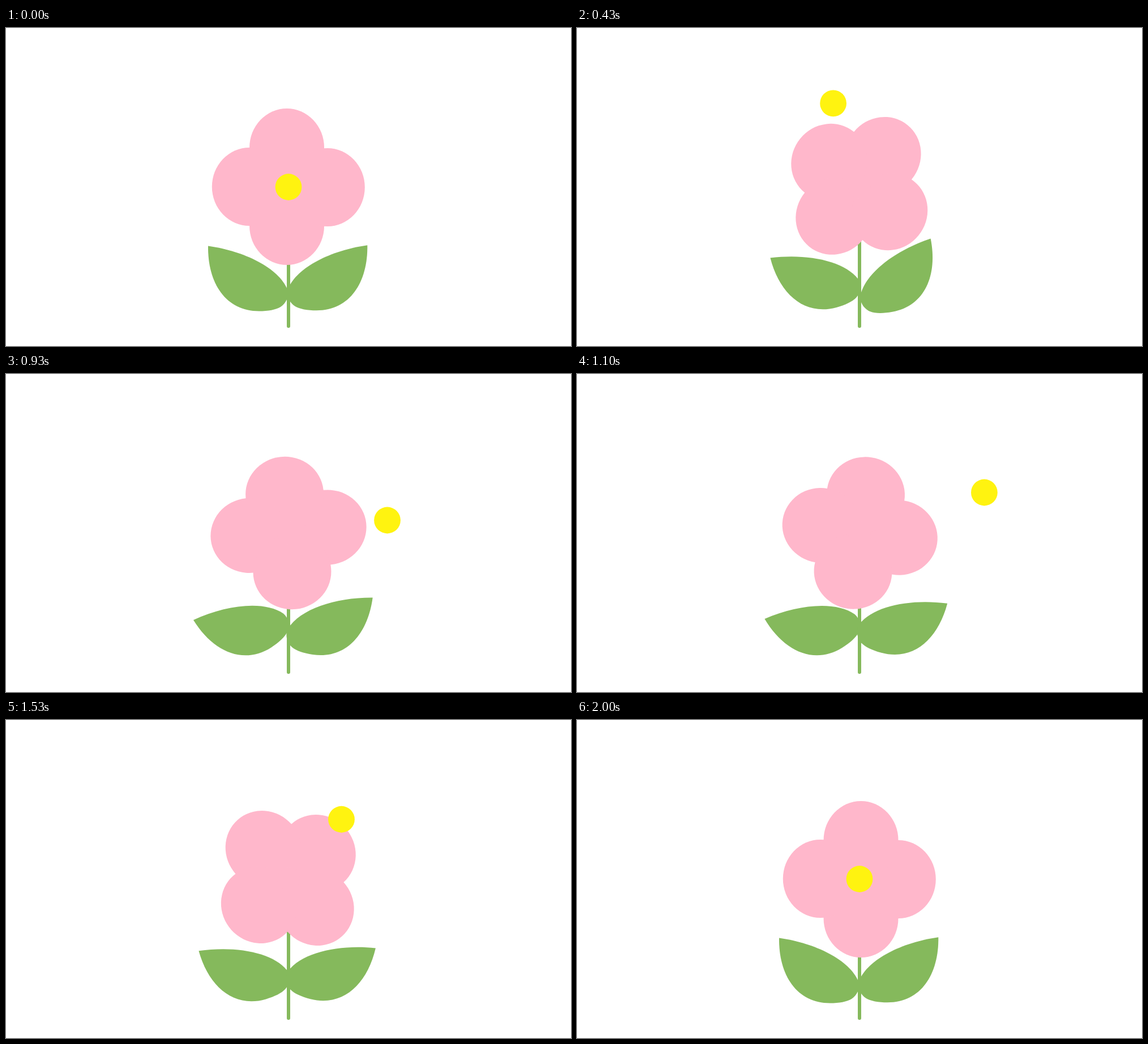
Write an HTML page with a canvas that moves like this. It is 998x561 px and loops after 2.03 s.

```html
<!DOCTYPE html>
<html lang="en">
<head>
<meta charset="utf-8">
<title>Flower</title>
<style>
  html, body { margin: 0; width: 100%; height: 100%; overflow: hidden; background: #fff; }
  canvas { display: block; }
</style>
</head>
<body>
<canvas id="stage" width="998" height="561"></canvas>
<script>
const ctx = document.getElementById('stage').getContext('2d');
const LOOP = 2030;
const PINK = '#ffb7cb', GREEN = '#85b95c', YELLOW = '#fff310';

const leaf = new Path2D(
  'M357 384.5 C421 393.5 481 423 497 461 C501 474 494 486 485 492 ' +
  'C477 497 463 499.5 447 499.5 C388 499.5 356 450 357 384.5 Z');
const PIVOT = { x: 428.3, y: 453.6 };

// Turning points of the disc's flight, n counted in steps
const flight = [
  { n: 0, x: 499, y: 280.5 },
  { n: 7, x: 392, y: 214.5 },
  { n: 12, x: 440, y: 133 },
  { n: 19, x: 543.5, y: 213 },
  { n: 28, x: 673.5, y: 258 },
  { n: 33, x: 719.4, y: 209 },
  { n: 38, x: 675.8, y: 156 },
  { n: 42, x: 631, y: 157 },
  { n: 53, x: 538.5, y: 229 },
  { n: 60, x: 499, y: 280.5 }
];

const slope = (a, b, axis) => (b[axis] - a[axis]) / (b.n - a.n);

function tangent(i, axis) {
  const prev = flight[i - 1], key = flight[i], next = flight[i + 1];
  if (!prev) return slope(key, next, axis);
  if (!next) return slope(prev, key, axis);
  const w = (key.n - prev.n) / (next.n - prev.n);
  return slope(key, next, axis) * w + slope(prev, key, axis) * (1 - w);
}

// Cubic Hermite curve through the turning points
function flightAt(n, axis) {
  const i = Math.max(1, flight.findIndex(key => key.n >= n));
  const a = flight[i - 1], b = flight[i];
  const h = b.n - a.n, u = (n - a.n) / h, v = 1 - u;
  return v * v * (1 + 2 * u) * a[axis] + u * u * (1 + 2 * v) * b[axis]
    + h * u * v * (v * tangent(i - 1, axis) - u * tangent(i, axis));
}

// Leaf angles in degrees: an even swing and a zigzag
const leftSwing = n => -35 * (1 - Math.abs(n / 30 - 1));
const rightSwing = n => Math.max(-0.8 * n, Math.min(1.41 * (n - 22), 60 - n));

const rad = deg => deg * Math.PI / 180;

function disc(x, y, rx, ry, color) {
  ctx.fillStyle = color;
  ctx.beginPath();
  ctx.ellipse(x, y, rx, ry, 0, 0, Math.PI * 2);
  ctx.fill();
}

function drawLeaf(x, y, deg, flip) {
  ctx.save();
  ctx.translate(x, y);
  ctx.rotate(rad(deg));
  ctx.scale(flip, 1);
  ctx.translate(-PIVOT.x, -PIVOT.y);
  ctx.fillStyle = GREEN;
  ctx.fill(leaf);
  ctx.restore();
}

function drawStem() {
  ctx.strokeStyle = GREEN;
  ctx.lineWidth = 6;
  ctx.lineCap = 'round';
  ctx.beginPath();
  ctx.moveTo(499, 300);
  ctx.lineTo(499, 526);
  ctx.stroke();
}

function drawPetals(deg) {
  ctx.save();
  ctx.translate(498.8, 280.5);
  ctx.rotate(rad(deg));
  for (const side of [-1, 1]) {
    disc(-2.75, 69 * side - 0.5, 66, 69, PINK);
    disc(69 * side, 0.5 * side, 66, 69, PINK);
  }
  disc(0, 0, 20, 20, PINK);
  ctx.restore();
}

function draw(n) {
  ctx.clearRect(0, 0, 998, 561);
  drawLeaf(PIVOT.x, PIVOT.y, leftSwing(n), 1);
  drawLeaf(567, 452.3, rightSwing(n), -1);
  drawStem();
  drawPetals(3 * n);
  disc(flightAt(n, 'x'), flightAt(n, 'y'), 23.4, 23.4, YELLOW);
}

// Thirty steps a second, each start rounded to 10 ms
const stepAt = t => Math.floor((Math.floor(t / 10) * 10 + 5) * 0.03);

let start = null;
function tick(now) {
  if (start === null) start = now;
  draw(stepAt(Math.max(0, now - start) % LOOP));
  requestAnimationFrame(tick);
}
draw(0);
requestAnimationFrame(tick);
</script>
</body>
</html>
```
